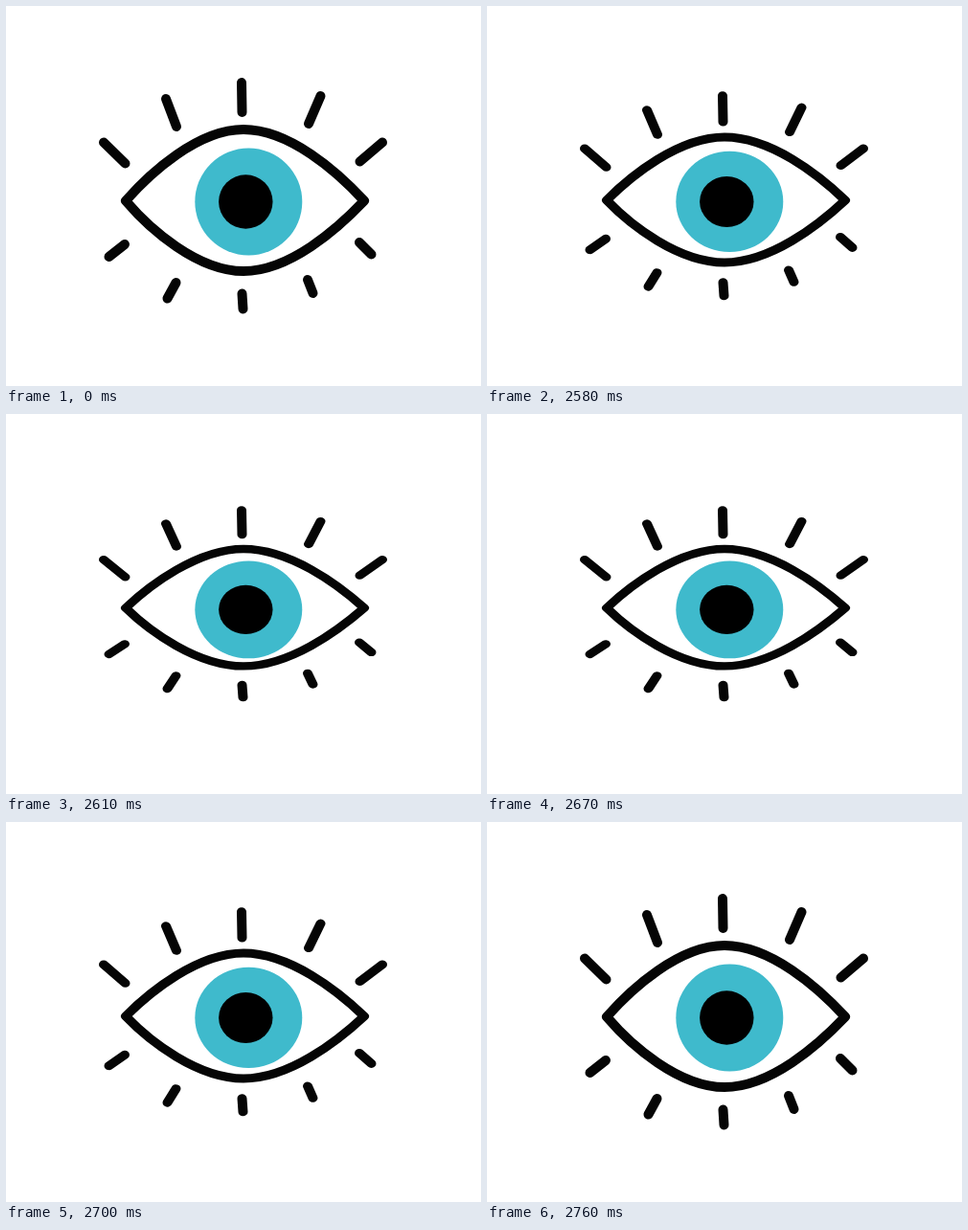
Write an HTML page that moves like this. It is 496x397 px and loops after 3.15 s.

```html
<!DOCTYPE html>
<html lang="en">
<head>
<meta charset="utf-8">
<title>Blinking eye</title>
<style>
  html, body { margin: 0; width: 100%; height: 100%; overflow: hidden; background: #fff; }
  svg { display: block; width: 100%; height: 100%; }
  #lids { fill: none; stroke: #050505; stroke-width: 10; stroke-linecap: round; stroke-linejoin: round; }
</style>
</head>
<body>
<svg viewBox="0 0 496 397">
  <g id="iris">
    <circle cx="253.3" cy="204.5" r="56" fill="#3fbacc"/>
    <circle cx="250.3" cy="204.5" r="28.2"/>
  </g>
  <g id="lids">
    <path d="M125 203.5C150 175 200 129 248 129S346 173 374 203.5C346 233 296 277 248 277S150 233 125 203.5Z"/>
    <!-- upper lashes, then lower lashes -->
    <path d="M102 142.5L124.5 164.5M167 97L178 126M246 80L246.5 111M328.5 94L316 123M393 142.5L369.5 162.5"/>
    <path d="M124 249L107.5 262M177.5 289L168.5 305.5M246.5 300.5L247.5 316.5M315 286L320.5 300M369 247L381.5 259.5"/>
  </g>
</svg>
<script>
  const LOOP = 3150, BLINK_START = 2550, STEP = 30, DEPTH = 4;
  const iris = document.getElementById('iris');
  const lids = document.getElementById('lids');

  function squash(group, scale, centerY) {
    group.setAttribute('transform', `translate(0 ${centerY * (1 - scale)}) scale(1 ${scale})`);
  }

  // The blink closes and reopens linearly in discrete steps.
  function draw(time) {
    const step = Math.floor((time % LOOP - BLINK_START) / STEP) + 1;
    const closed = Math.max(0, DEPTH - Math.abs(step - DEPTH));
    squash(lids, 1 - 0.0575 * closed, 198.5);
    squash(iris, 1 - 0.03 * closed, 203);
  }

  const start = performance.now();
  function tick() {
    draw(performance.now() - start);
    requestAnimationFrame(tick);
  }
  tick();
</script>
</body>
</html>
```
